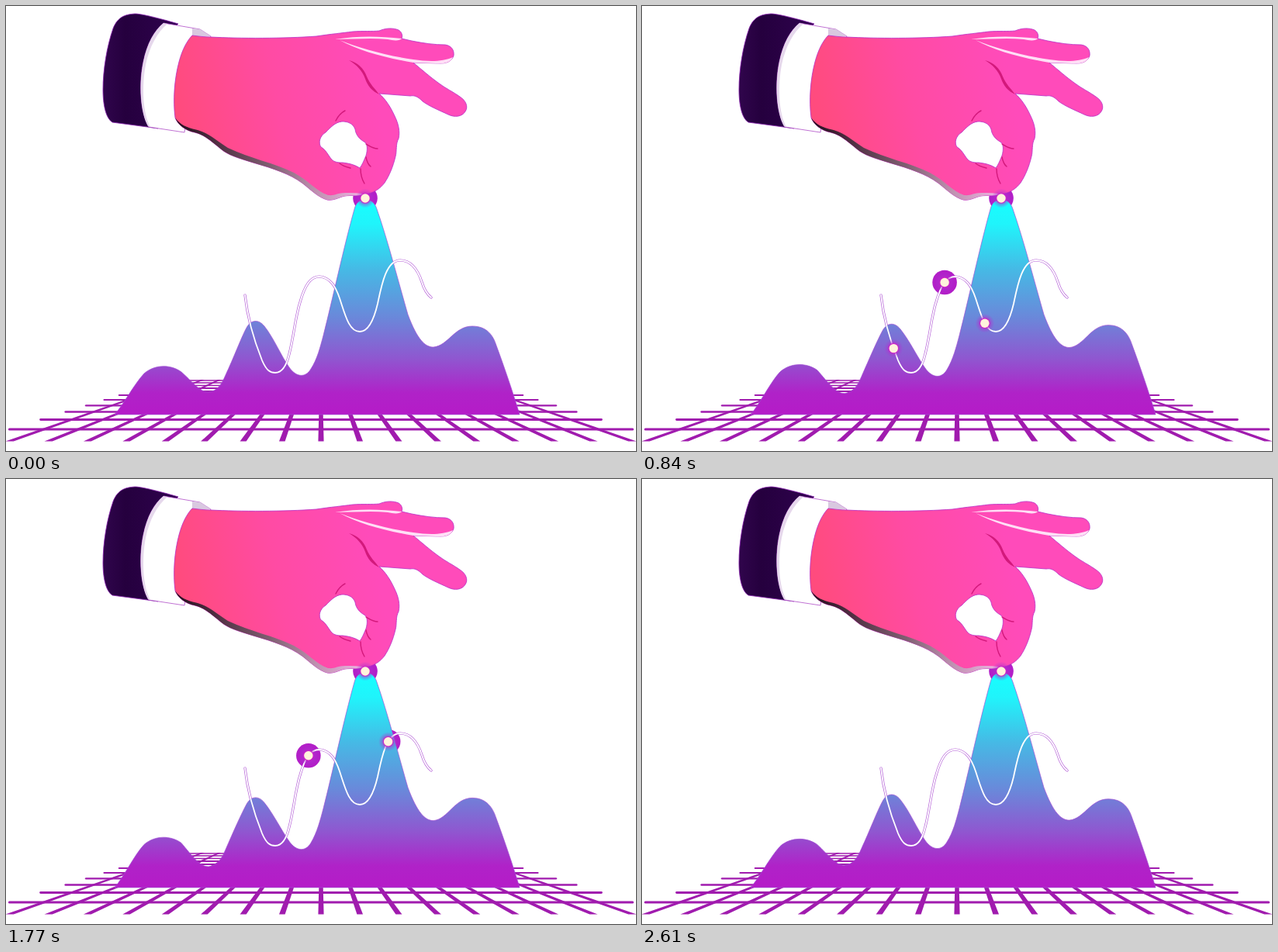
Animation of 812x574 px, one loop 2.64 s. Source, as an HTML page:

```html
<!DOCTYPE html>
<html lang="en">
<head>
<meta charset="utf-8">
<title>Hand lifting a chart</title>
<style>
  html, body { margin: 0; width: 100%; height: 100%; overflow: hidden; background: #fff; }
  svg { display: block; width: 812px; height: 574px; }
  .line { fill: none; stroke-linecap: round; stroke-linejoin: round; }
</style>
</head>
<body>
<svg viewBox="0 0 812 574">
  <defs>
    <linearGradient id="area" gradientUnits="userSpaceOnUse" x1="0" y1="248" x2="0" y2="527">
      <stop offset="0" stop-color="#16ffff"/>
      <stop offset=".12" stop-color="#20f4fb"/>
      <stop offset=".33" stop-color="#46b9e5"/>
      <stop offset=".55" stop-color="#6a88da"/>
      <stop offset=".74" stop-color="#8f57d0"/>
      <stop offset=".9" stop-color="#b022c8"/>
      <stop offset="1" stop-color="#b51bc8"/>
    </linearGradient>
    <linearGradient id="skin" gradientUnits="userSpaceOnUse" x1="215" y1="120" x2="470" y2="70">
      <stop offset="0" stop-color="#ff4b7c"/>
      <stop offset=".5" stop-color="#ff4ba3"/>
      <stop offset="1" stop-color="#ff4bba"/>
    </linearGradient>
    <linearGradient id="under" gradientUnits="userSpaceOnUse" x1="220" y1="0" x2="463" y2="0">
      <stop offset="0" stop-color="#26101f"/>
      <stop offset=".2" stop-color="#4e2d40"/>
      <stop offset=".5" stop-color="#806072"/>
      <stop offset=".75" stop-color="#c093b2"/>
      <stop offset="1" stop-color="#f0b4e4"/>
    </linearGradient>
    <linearGradient id="sleeve" x1="0" y1="0" x2="1" y2="0">
      <stop offset="0" stop-color="#30054c"/>
      <stop offset=".3" stop-color="#25003e"/>
      <stop offset="1" stop-color="#2f024e"/>
    </linearGradient>
    <radialGradient id="glow">
      <stop offset=".48" stop-color="#d020c8"/>
      <stop offset=".6" stop-color="#b42ccc" stop-opacity=".5"/>
      <stop offset="1" stop-color="#a040d8" stop-opacity="0"/>
    </radialGradient>
    <path id="curve" d="M308 373C311 400 320 432 330 457C336 471 341 473 347 473C355 473 361 466 365 449C371 426 373 401 379 382C385 361 392 349 404 349C418 350 425 362 430 377C437 398 442 420 456 420C468 420 475 401 479 384C484 360 490 328 508 328C522 328 531 341 536 356C539 366 543 372 548 376"/>
  </defs>

  <g id="grid" fill="#a01bae"></g>
  <use href="#curve" class="line" stroke="#b765d8" stroke-width="3.2"/>
  <g id="discs" fill="#b21fc8"></g>
  <path id="hills" fill="url(#area)" stroke="#a24fd4" stroke-width=".7"/>

  <g id="arm">
    <path fill="url(#sleeve)" stroke="#8a1fb0" stroke-width=".8" d="M166 10C176 10 205 18 222 23L205 40L196 158L182 156L137 150C128 144 125 126 125 108C125 82 130 52 138 29C144 14 153 11 166 10Z"/>
    <path fill="#fff" stroke="#b04fc8" stroke-width=".8" d="M203 22L250 30L264 39L240 90L230 163L184 156C173 138 171 100 177 72C182 48 191 32 203 22Z"/>
    <path fill="#e6d8ec" d="M203 22L208 23C195 34 185 52 180 76C175 103 176 138 186 156L183 155C173 138 171 100 177 72C182 48 191 32 203 22Z"/>
    <path fill="#d9c8e0" d="M240 29L250 30L264 39L240 39Z"/>
    <path fill="url(#skin)" fill-rule="evenodd" stroke="#b52bc4" stroke-width=".8" d="M240 38C248 39 256 40 264 40C300 42 360 42 400 39C420 36 432 35 447 33C460 32 472 33 481 32C488 29 496 28 503 30C509 31 512 37 510 42L523 45C538 48 552 50 566 50C574 51 578 57 577 64C575 70 570 74 560 74L525 73C537 83 546 91 557 99C566 106 577 111 585 117C593 122 596 130 592 136C588 143 578 144 570 140C557 134 545 129 537 123C531 117 527 115 521 116C508 115 494 114 481 113C490 121 496 131 501 142C506 152 508 162 506 171C502 178 504 187 502 194C499 207 494 219 488 228C482 236 474 241 463 243C452 246 441 243 433 246C425 249 420 251 414 250C403 247 394 238 382 228.500C366 216.500 344 209.500 320 202.500C304 197.500 291 194 281 187.500C267 177 257 166 243 163C232 161 221 153 218 144C215 122 217 94 223 72C227 57 233 45 240 38Z
      M433 149C424 150 418 157 412 163C405 167 402 176 406 182C412 185 415 192 419 197C423 202 429 202 434 202C443 203 450 205 456 209C459 205 461 200 464 193C466 186 466 179 463 176C456 172 451 167 450 159C447 151 440 149 433 149Z"/>
    <path fill="url(#under)" d="M218 144C224 153 233 157 245 159.500C260 163 272 174 286 183C315 197 345 202 371 215C390 225 400 239 415 244C424 245 427 241 437 241C447 241 456 241 463 243C452 246 441 243 433 246C425 249 420 251 414 250C403 247 394 238 382 228.500C366 216.500 344 209.500 320 202.500C304 197.500 291 194 281 187.500C267 177 257 166 243 163C232 161 221 153 218 144Z"/>
    <path fill="#ffdff6" d="M424 43C455 38 482 39 510 42C508 45 500 45 492 43C470 41 448 43 424 43Z"/>
    <path fill="#ffdff6" d="M430 44C455 54 490 64 525 69C545 72 563 72 576 66C573 73 565 75 554 74L525 73C490 67 455 58 430 44Z"/>
    <path fill="#d3197c" d="M442 70C453 73 461 80 465 91C469 101 476 107 481 114C472 110 466 103 463 94C459 83 452 76 442 70Z"/>
    <g class="line" stroke="#d3197c" stroke-width="1.4">
      <path d="M425 148C428 142 431 138 437 135"/>
      <path d="M464 178C469 181 473 184 479 184"/>
      <path d="M464 195C465 200 466 204 470 207"/>
      <path d="M457 210C457 218 459 224 462 229"/>
      <path d="M430 203C435 207 440 208 444 209"/>
    </g>
  </g>

  <use href="#curve" class="line" stroke="#fff" stroke-width="1.8"/>
  <g id="dots"></g>
</svg>
<script>
const $ = id => document.getElementById(id);
const add = (parent, tag, attrs) => {
  const el = document.createElementNS('http://www.w3.org/2000/svg', tag);
  for (const k in attrs) el.setAttribute(k, attrs[k]);
  return parent.appendChild(el);
};

const LOOP = 2640, STEP = 30, SWAY = 660, SPEED = 0.4015;
const starts = [12, 240, 664, 1171];
const curve = $('curve'), length = curve.getTotalLength();

// Floor in one-point perspective
const CX = 406, HORIZON = 421, NEAR = 561.5, FAR = 482;
const depth = y => (y - HORIZON) / (NEAR - HORIZON);
for (const y of [546, 533.5, 523.5, 515.3, 508, 502, 497, 493, 489.5, 486, 483]) {
  const half = 3.225 * (y - HORIZON), h = 3.5 * depth(y);
  add($('grid'), 'rect', { x: CX - half, y: y - h / 2, width: 2 * half, height: h, rx: h / 2 });
}
for (let i = -8; i <= 8; i++) {
  const w = 3.6 + Math.abs(i) * 0.22;
  const at = (y, side) => `${CX + (i * 50.2 + side * w) * depth(y)},${y}`;
  add($('grid'), 'polygon', { points: [at(FAR, -1), at(FAR, 1), at(NEAR, 1), at(NEAR, -1)].join(' ') });
}

function makeDot() {
  const disc = add($('discs'), 'circle', { r: 15.8 });
  const core = add($('dots'), 'g', {});
  add(core, 'circle', { r: 12.5, fill: 'url(#glow)' });
  add(core, 'circle', { r: 5.7, fill: '#fff4dc' });
  return [disc, core];
}
function place(dot, p) {
  for (const el of dot) {
    el.style.display = p ? '' : 'none';
    if (p) el.setAttribute('transform', `translate(${p.x} ${p.y})`);
  }
}

// k runs from 0 to 1: the side hills breathe while the main peak stays held
function hills(k) {
  const a = -4 * k, b = 3 * k, c = 7 * k, d = 2 * k, e = k, f = -2.5 * k;
  return `M140 527C152 513 165 ${488 + a} 178 ${474 + a}C192 ${462 + a} 212 ${462 + a} 226 ${472 + a}` +
    `C240 ${484 + b} 249 ${498 + b} 261 ${498 + b}C272 ${497 + b} 278 ${488 + b} 283 ${476 + b}` +
    `C293 455 303 ${428 + c} 310 ${415 + c}C316 ${404 + c} 326 ${404 + c} 333 ${413 + c}` +
    `C345 ${428 + c} 355 ${452 + d} 365 ${466 + d}C374 ${479 + d} 386 ${480 + d} 393 ${468 + d}` +
    `C401 456 405 440 409 425C420 382 436 308 449 262C453 245 473 245 478 262` +
    `C492 302 507 360 518 398C530 430 540 ${440 + e} 551 ${440 + e}` +
    `C570 ${438 + e} 578 ${413 + f} 601 ${413 + f}C620 ${413 + f} 628 425 632 438C642 465 654 500 662 527Z`;
}

place(makeDot(), { x: 463, y: 248 });
const runners = starts.map(makeDot);
const origin = performance.now();

function draw() {
  const now = (performance.now() - origin) % LOOP;
  const t = Math.floor(now / STEP) * STEP;
  const phase = (t % SWAY) / SWAY;
  $('hills').setAttribute('d', hills(1 - Math.abs(2 * phase - 1)));
  runners.forEach((dot, i) => {
    const s = (t - starts[i]) * SPEED;
    place(dot, s >= 0 && s <= length ? curve.getPointAtLength(s) : null);
  });
  requestAnimationFrame(draw);
}
draw();
</script>
</body>
</html>
```
